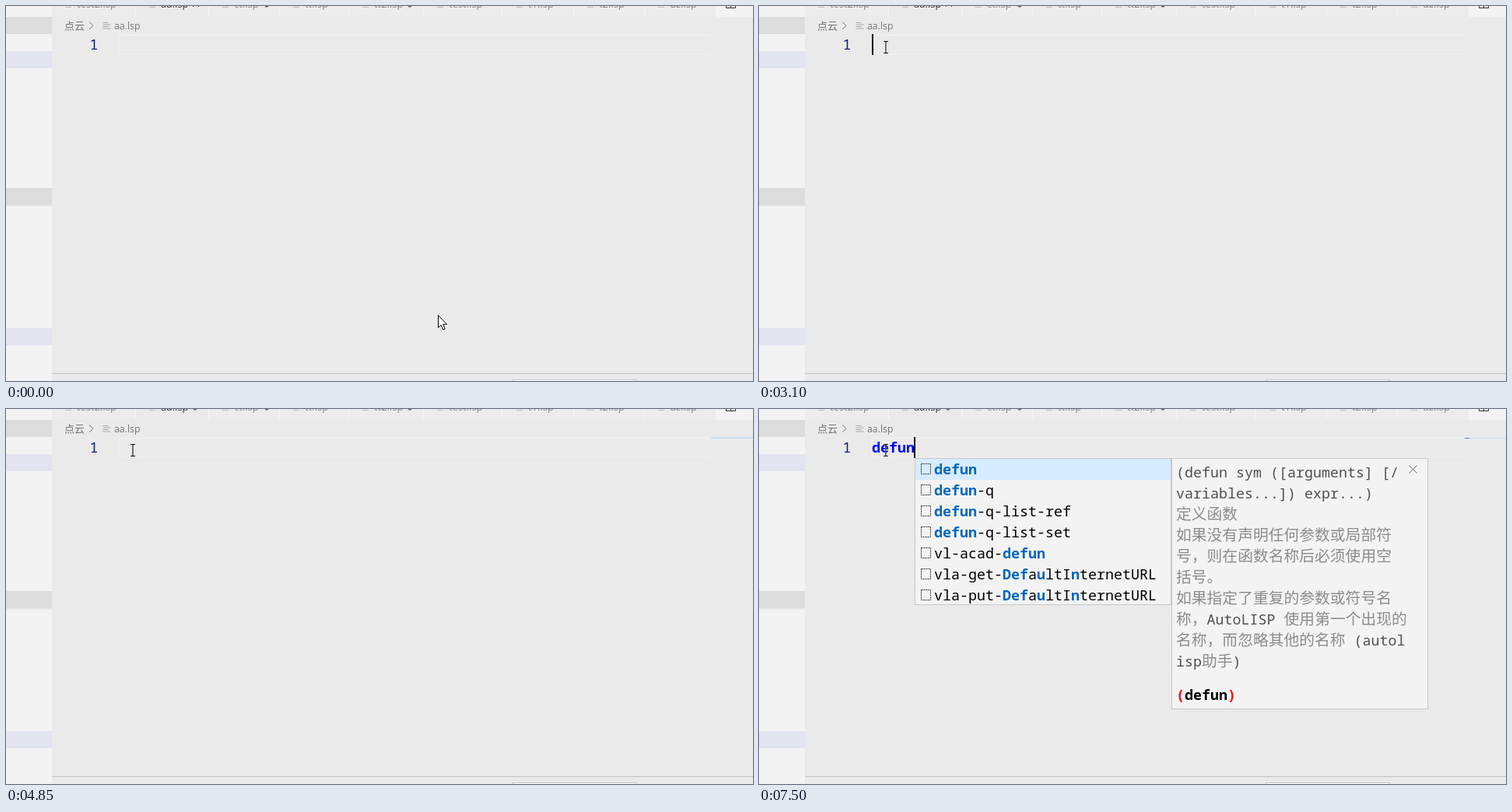
An HTML page that plays this animation: 960x482 px, repeating every 8000 ms.

```html
<!DOCTYPE html>
<html lang="zh-CN">
<head>
<meta charset="utf-8">
<title>Editor completion</title>
<style>
  html, body { margin: 0; width: 100%; height: 100%; overflow: hidden; background: #eaeaea; }
  svg { display: block; width: 100vw; height: 100vh; }
  text { white-space: pre; }
  .ui { font: 12.3px "Open Sans", "Noto Sans CJK SC", sans-serif; fill: #767676; }
  .tab { font-size: 13px; fill: #858585; }
  .code { font: 18.33px "Noto Sans Mono", monospace; }
  .cjk { font-family: "Noto Sans CJK SC", "Noto Sans CJK", sans-serif; font-size: 19.8px; font-weight: 300; fill: #8c8c8c; }
  .doc { fill: #505050; }
  .hit { fill: #0066bf; font-weight: bold; }
  .number { font-weight: 500; fill: #0b216f; }
  .bold { font-weight: bold; }
  .ime { font: 300 16px "Noto Sans CJK SC", "Noto Sans CJK", sans-serif; fill: #747474; }
</style>
</head>
<body>
<svg id="stage" viewBox="0 0 960 482"></svg>
<script>
const LOOP = 8000, CELL = 10.996, TEXT_X = 145;
const stage = document.getElementById('stage');

const rect = (x, y, w, h, fill, extra = '') =>
  `<rect x="${x}" y="${y}" width="${w}" height="${h}" fill="${fill}" ${extra}/>`;
const line = (d, stroke, extra = '') => `<path d="${d}" stroke="${stroke}" fill="none" ${extra}/>`;
const text = (x, y, cls, body, extra = '') => `<text x="${x}" y="${y}" class="${cls}" ${extra}>${body}</text>`;
const group = (id, body) => `<g id="${id}">${body}</g>`;

const markHits = s => s.replace(/\*(.+?)\*/g, '<tspan class="hit">$1</tspan>');
const markCjk = s => s.replace(/[\u3000-\u9fff\uff00-\uffef]+/g, '<tspan class="cjk">$&</tspan>');
const fileIcon = (x, y) => line(`M${x} ${y}h7m-7 2.5h10m-10 2.5h7m-7 2.5h10`, '#a8a8a8');

// Tabs: label, label x, right edge, unsaved marker x
const tabs = [
  ['test2.lsp', 91, 166], ['aa.lsp', 199, 260], ['ct.lsp', 293, 351, 335], ['tt.lsp', 384, 440],
  ['tt2.lsp', 473, 536, 519], ['test.lsp', 569, 637], ['t1.lsp', 671, 729], ['t2.lsp', 762, 820],
  ['dz.lsp', 853, 912]
];
const dot = x => `<circle cx="${x}" cy="-1" r="2.8" fill="#666"/>`;

function chrome() {
  const tabStrip = tabs.map(([name, x, edge, mark], i) =>
    text(x, 2, 'ui tab', name, i === 1 ? 'style="fill:#333"' : '') +
    line(`M${x - 15} -.5h7m-7 2h8`, '#bcbcbc') +
    rect(edge, 0, 1, 13, '#f5f5f5') + (mark ? dot(mark) : '')).join('');
  return rect(0, 0, 960, 482, '#eaeaea') +
    rect(59, 0, 854, 13, '#ececec') + rect(167, 0, 93, 14, '#eaeaea') + tabStrip +
    rect(913, 0, 47, 14, '#f3f3f3') + line('M925.5 0v2.5h12v-2.5M931.5 0v2.5', '#333') +
    rect(0, 0, 59, 482, '#f3f3f3') +
    rect(0, 14, 59, 22, '#dcdcdc') + rect(0, 58, 59, 22, '#e2e4f0') +
    rect(0, 234, 59, 22, '#dcdcdc') + rect(0, 256, 59, 2, '#e9e9e9') +
    rect(0, 414, 59, 22, '#e2e4f0') +
    text(75, 30, 'ui', '点云', 'style="font-size:13px"') + line('M107 20.5l5 4.7-5 4.7', '#777') +
    fileIcon(124.5, 21.5) + text(139, 30, 'ui', 'aa.lsp') +
    line('M906 37.5H145.5V62H906', '#f0f0f0', 'stroke-width="1.3"') +
    text(107.5, 56, 'code number', '1') +
    rect(59, 472, 901, 1, '#c3c3c3') +
    rect(651.5, 480.5, 159, 4, '#fff', 'stroke="#c8c8c8"');
}

const docLines = [
  '(defun sym ([arguments] [/', 'variables...]) expr...)', '定义函数',
  '如果没有声明任何参数或局部符', '号，则在函数名称后必须使用空', '括号。',
  '如果指定了重复的参数或符号名', '称，AutoLISP 使用第一个出现的',
  '名称，而忽略其他的名称 (autol', 'isp助手)'
];
const defuns = ['*def*un', '*def*un-q', '*def*un-q-list-ref', '*def*un-q-list-set'];
const narrowed = s => s.replace('*def*', '*de*f');
const widened = s => s.replace('*def*un', '*defun*');
const lists = {
  de: [...defuns.map(narrowed), '*d*on*e*_dialog', 'vl-acad-*de*fun', 'vl-file-*de*lete',
    'vl-registry-*de*lete', 'vl-registry-*de*scendents', 'vla-get-ADCInsertUnits*De*f…',
    'vla-get-ADCInsertUnits*De*f…', 'vla-get-*De*cimalSeparator'],
  def: [...defuns, 'vl-acad-*def*un', 'vla-get-ADCInsertUnits*Def*…', 'vla-get-ADCInsertUnits*Def*…',
    'vla-get-*Def*aultInternetURL', 'vla-put-ADCInsertUnits*Def*…', 'vla-put-ADCInsertUnits*Def*…',
    'vla-put-*Def*aultInternetURL', 'vlax-*def*-object'],
  defun: [...defuns.map(widened), 'vl-acad-*defun*', 'vla-get-*Def*a*u*ltI*n*ternetURL',
    'vla-put-*Def*a*u*ltI*n*ternetURL']
};
const popupX = word => Math.round(TEXT_X + CELL * word.length);

function listBox(word) {
  const rows = lists[word], x = popupX(word);
  const items = rows.map((row, i) => {
    const y = 64 + i * 27;
    return rect(x + 8.5, y + 6.5, 12, 13, 'none', 'stroke="#333" stroke-dasharray="2 1"') +
      text(x + 25, y + 20, 'code', markHits(row));
  }).join('');
  return group('list-' + word,
    rect(x + .5, 63.5, 329, rows.length > 7 ? 323 : 188, '#f3f3f3', 'stroke="#c8c8c8"') +
    rect(x + 1, 64, 328, 27, '#d6ebff') + items);
}

const docBox = group('doc',
  rect(330.5, 63.5, 329, 322, '#f3f3f3', 'stroke="#c8c8c8"') +
  docLines.map((s, i) => text(336, 88 + i * 27, 'code doc', markCjk(s))).join('') +
  text(336, 374, 'code bold', '<tspan fill="#f00">(</tspan>defun<tspan fill="#f00">)</tspan>') +
  line('M635.5 72.5l10 10m0-10l-10 10', '#666'));

const imeBox = group('ime',
  rect(158.5, 64.5, 255, 36, '#f3f3f3', 'stroke="#3d8fe0"') +
  [...'的得德地の'].map((c, i) =>
    text(174 + i * 41.8, 88, 'ime', `${i + 1}.${c}`, i ? '' : 'style="fill:#2b8ee8"')).join('') +
  '<path d="M386 78v9l-5-4.5z" fill="#d0d0d0"/><path d="M396 78v9l5-4.5z" fill="#2b8ee8"/>');

const arrow = group('arrow',
  '<path d="M.5 .5V16.5L4 13.2L6.8 19L9.2 18L6.6 12.2H11.5Z" fill="#fff" stroke="#000"/>');
const beamPath = 'M-3-7.5h2.5l.5.6.5-.6h2.5M0-7V7M-3 7.5h2.5l.5-.6.5.6h2.5';
const beam = group('beam',
  line(beamPath, '#fff', 'stroke-width="2.4" opacity=".6"') + line(beamPath, '#000', 'stroke-width="1.1"'));

stage.innerHTML = chrome() +
  group('saved', line('M240 -7l8 8m0-8l-8 8', '#444')) +
  group('unsaved', dot(243) + rect(906, 36, 54, 2, '#c6dff0', 'id="miniLine"')) +
  rect(907, 37, 0, 1, '#6a7fc0', 'id="mini"') +
  text(TEXT_X, 56, 'code', '', 'id="typed"') +
  rect(146, 60, 0, 1, '#000', 'id="underline"') +
  Object.keys(lists).map(listBox).join('') +
  rect(486, 64, 10, 32, '#8c8c8c', 'id="scrollbar" opacity=".65"') + docBox +
  rect(0, 36, 2, 27, '#000', 'id="caret"') + imeBox + beam + arrow;

const el = id => document.getElementById(id);
const show = (id, on) => el(id).setAttribute('display', on ? 'inline' : 'none');
const within = (t, ...spans) => spans.some(([a, b]) => t >= a && t < b);
const latest = (t, steps) => steps.reduce((value, [at, next]) => t >= at ? next : value, '');

// Pointer moves: start time, number of 50 ms steps, destination
const moves = [[500, 14, 207, 63], [1400, 4, 180, 48], [2150, 6, 163, 53]];
function pointerAt(t) {
  let x = 555, y = 397;
  for (const [start, steps, toX, toY] of moves) {
    if (t < start) break;
    const p = Math.min(1, (Math.floor((t - start) / 50) + 1) / steps);
    const ease = p * p * (3 - 2 * p);
    x += (toX - x) * ease;
    y += (toY - y) * ease;
  }
  return `translate(${Math.round(x)} ${Math.round(y)})`;
}

const typing = [[3500, 'd'], [3650, 'de'], [4150, 'd'], [4250, ''],
  [5400, 'd'], [5650, 'de'], [6300, 'def'], [6700, 'defun']];

function draw(t) {
  const word = latest(t, typing), composing = within(t, [3500, 4250]);
  const listOpen = within(t, [4000, 4150], [5800, LOOP]);
  const typed = el('typed');
  if (typed.textContent !== word) typed.textContent = word;
  typed.setAttribute('fill', word === 'defun' ? '#00f' : '#000');
  typed.classList.toggle('bold', !composing);
  el('underline').setAttribute('width', composing ? word.length * 11 - 1 : 0);
  el('mini').setAttribute('width', word ? word.length + 1 : 0);
  el('miniLine').setAttribute('y', word ? 37 : 36);
  el('miniLine').setAttribute('height', word ? 1 : 2);

  show('saved', t < 3500);
  show('unsaved', t >= 3500);
  show('ime', composing);
  for (const key in lists) show('list-' + key, listOpen && key === word);
  show('scrollbar', within(t, [5800, 6300]));
  show('doc', listOpen && !within(t, [5800, 5900]));
  el('doc').setAttribute('transform', `translate(${popupX(word)} 0)`);

  show('caret', within(t, [2150, 2650], [3100, 4850], [5350, 5950], [6300, 7000], [7500, LOOP]));
  el('caret').setAttribute('x', Math.floor(TEXT_X + CELL * word.length));

  show('arrow', t < 2150);
  show('beam', t >= 2150);
  for (const id of ['arrow', 'beam']) el(id).setAttribute('transform', pointerAt(t));
}

const began = performance.now();
function tick() {
  draw((performance.now() - began) % LOOP);
  requestAnimationFrame(tick);
}
tick();
</script>
</body>
</html>
```
